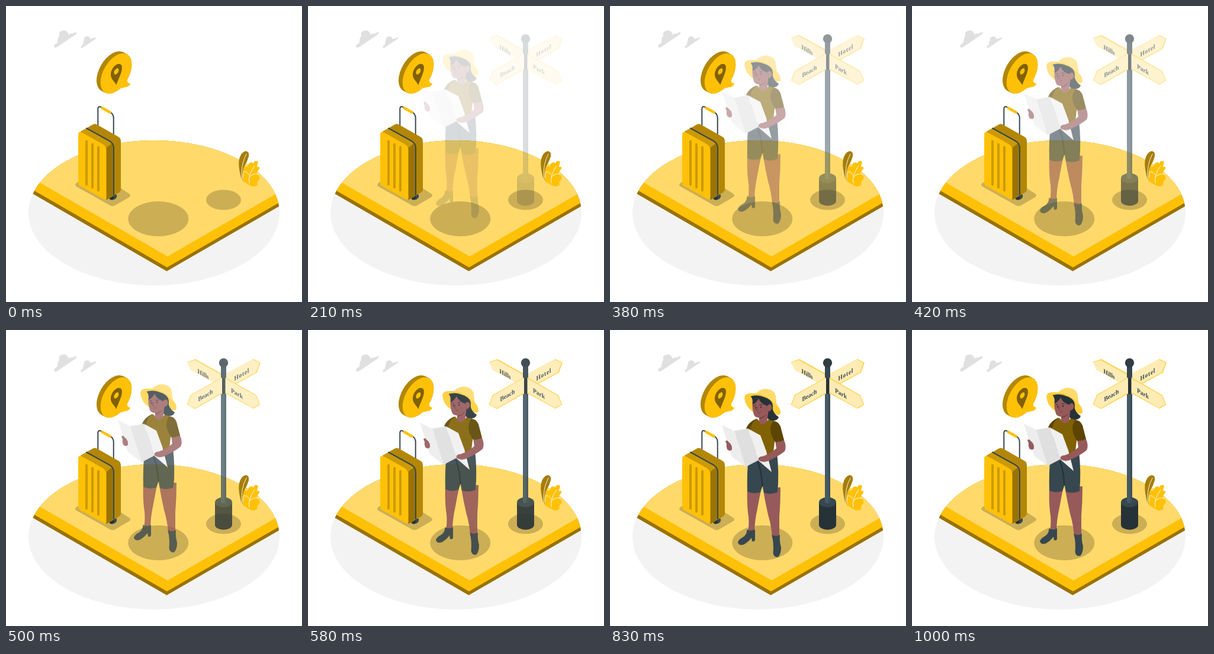
An HTML page with a canvas for the animation above (1040 ms loop, 500 px wide and 500 px high).

```html
<!DOCTYPE html>
<html lang="en">
<head>
<meta charset="utf-8">
<title>Traveller with a map</title>
<style>
  html, body { margin: 0; width: 100%; height: 100%; overflow: hidden; background: #fff; }
  canvas { display: block; width: 500px; height: 500px; }
</style>
</head>
<body>
<canvas id="stage" width="500" height="500"></canvas>
<script>
const SIZE = 500, LOOP = 1040, STEP = 1000 / 24, LAST = 24;
const YELLOW = '#ffc107', PALE = '#ffda6a', CREAM = '#ffecb4', SLATE = '#37474f',
      NIGHT = '#263238', SKIN = '#965a5a', SHADE = '#ccae55', OCHRE = '#b38705',
      BROWN = '#997404', GOLD = '#cc9a06';

const stage = document.getElementById('stage').getContext('2d');
let g;

function layer(draw) {
  const c = document.createElement('canvas');
  c.width = c.height = SIZE;
  g = c.getContext('2d');
  g.lineCap = g.lineJoin = 'round';
  draw();
  return c;
}

function fill(color, path) {
  g.fillStyle = color;
  g.fill(new Path2D(path));
}

function line(color, width, path) {
  g.strokeStyle = color;
  g.lineWidth = width;
  g.stroke(new Path2D(path));
}

function oval(color, x, y, rx, ry, turn = 0) {
  g.fillStyle = color;
  g.beginPath();
  g.ellipse(x, y, rx, ry, turn, 0, Math.PI * 2);
  g.fill();
}

// Draws on an upright isometric plane; slope is -0.5 (rising) or 0.5 (falling).
function onWall(x, y, slope, draw) {
  g.save();
  g.transform(0.866, slope, 0, 1, x, y);
  draw();
  g.restore();
}

function ground() {
  oval('#f3f3f3', 250, 349.5, 212, 122.5);
  g.save();
  g.beginPath();
  g.ellipse(250, 349.5, 212, 122.5, 0, 0, Math.PI * 2);
  g.clip();
  const slab = (color, x, y) => {
    const drop = 300 * 0.578;
    fill(color, `M${x} ${y}L${x - 300} ${y - drop}V0H500L${x + 300} ${y - drop}Z`);
  };
  slab('#9a7204', 271.5, 448);
  slab(YELLOW, 272, 441.5);
  slab(PALE, 273, 423);
  g.restore();
  oval(SHADE, 257.3, 359.5, 51, 29.5);
  oval(SHADE, 367.5, 327.5, 29.5, 17);
}

function cloud(x, y, k) {
  g.save();
  g.translate(x, y);
  g.scale(k, k);
  fill('#e0e0e0', 'M0 27Q1 23 6 21Q6 12 9 10Q7 3 13 1Q22 -2 25 8Q27 4 30 6L37 3Q40 4 37 7L6 28Q1 31 0 27Z');
  g.restore();
}

function suitcase() {
  fill(SHADE, 'M119 299L124 296L194 308L208 317Q212 320 208 323L184 337Q180 339 176 337L119 305Q115 302 119 299Z');
  oval(SLATE, 181, 322, 6.5, 5.2, -0.5);
  oval(NIGHT, 178, 323, 4, 4.5);
  line(SLATE, 2, 'M155.3 203V174Q155.3 168 161 171L176 179Q181.7 183 181.7 189V219');
  line(YELLOW, 4.6, 'M162.5 172.3L175.5 179.5');
  fill(OCHRE, 'M126 212L147 200Q150 198.500 153 200L190 221Q194 223 194 229V309Q194 313 191 315L171 327L160 300L140 240Z');
  fill(GOLD, 'M126 212L136 206.500L175 228L181 233L170 239Z');
  fill(BROWN, 'M169 243Q170 238 175 235L181 231V320L172 326L169 327Z');
  fill(YELLOW, 'M122 218Q122 210 129 214L163 233Q169.500 237 169.500 243V324Q169.500 328 165 326L125 304Q122 302 122 299Z');
  line(SLATE, 2, 'M136 206.500L174 227.500Q182 232 182 240V319');
  for (let i = 0; i < 3; i++) {
    const x = 136 + i * 10, y = 228.500 + i * 5;
    line(GOLD, 4, `M${x} ${y}V${y + 73}`);
  }
}

function bubble() {
  const disc = (color, x, y) => onWall(x, y, -0.5, () => oval(color, 0, 0, 30.4, 30.4));
  for (let i = 0; i <= 14; i++) disc(OCHRE, 179.3 + i * 0.48, 110.6 + i * 0.24);
  disc(YELLOW, 186, 114);
  fill(YELLOW, 'M205 120Q203 131 210.500 131Q207 137 202 137L190 140Z');
  onWall(186.4, 110, -0.5, () => {
    fill('#806104', 'M-11 0A11 11 0 0 1 11 0C11 8 4 15 0 23.500C-4 15 -11 8 -11 0Z');
    oval(YELLOW, 0, 0.500, 4.6, 4.6);
  });
}

function plant() {
  fill('#a67d05', 'M398 293Q392 273 393.500 261Q396 247 405 245Q411.500 246 410 254Q408 262 403 270Q398 281 400 294Z');
  line('#fff', 0.9, 'M398.500 293Q396 268 406 250');
  fill(YELLOW, 'M400 296Q403 284 401 278Q400 272 404 271Q408 272 409 270Q409 264 416 264Q418 268 419 263Q424 260 426 264Q424 269 424 272Q429 270 428 275Q423 280 424 284Q430 287 428 293Q423 296 425 302Q420 306 414 304Q408 301 400 296Z');
  line('#fff', 0.9, 'M411 299Q408 286 420 270M402 280Q407 279 410 285M426 284Q417 282 411 289');
}

function signpost() {
  // Base and post
  fill(NIGHT, 'M353 291V329A14.500 8.500 0 0 0 382 329V291Z');
  oval(SLATE, 367.5, 291, 14.5, 8.5);
  fill('#455a64', 'M363 108H372V290A4.500 2.600 0 0 1 363 290Z');
  fill('#3c4f58', 'M369 108H372V290L369 292Z');
  // Boards, upper pair behind
  fill('#ffd352', 'M306 54L320 49L364 73.500V96L312 67Z');
  fill(CREAM, 'M306 55L319 51L364 76V96L312 67.500Z');
  fill('#ffd352', 'M371 74L418 49L430 55L424 72L371 101Z');
  fill(CREAM, 'M371 74L417 50L428 55.500L422 71.500L371 99Z');
  fill('#ffd352', 'M364.500 80L312 109.500L305.500 126L319 133.500L364.500 108Z');
  fill(CREAM, 'M364.500 81L313 110.500L307 126L319 132L364.500 106Z');
  fill('#ffd352', 'M370.500 80L423 110L429.500 126L418 133L370.500 107Z');
  fill(CREAM, 'M370.500 82L422 111L428 125.500L417 131.500L370.500 105Z');
  fill(NIGHT, 'M365 80H370.500V108H365Z');
  fill(SLATE, 'M363 60H372V79A4.500 2.600 0 0 1 363 79Z');
  oval('#2f3d44', 367.5, 55.5, 7.7, 7.7);

  g.font = 'bold 11px "Liberation Serif", "Times New Roman", serif';
  const label = (text, x, y, slope, gap = '0px') => onWall(x, y, slope, () => {
    g.letterSpacing = gap;
    g.fillStyle = SLATE;
    g.fillText(text, 0, 0);
  });
  label('Hills', 323.5, 72.5, 0.5);
  label('Hotel', 385.5, 86, -0.5, '0.8px');
  label('Beach', 324.5, 121, -0.5);
  label('Park', 380, 105, 0.5);
}

function head() {
  fill('#ffcd38', 'M227 114Q228 106 240 107Q264 106 277 121Q289 132 288 141Q286 146 279 142L241 138Q228 129 227 114Z');
  fill(PALE, 'M247 107Q254 99 264 99.500Q277 101 279.500 110L282 128Q266 110 247 107Z');
  fill(NIGHT, 'M264 122Q276 126 275 135Q278 143 285 147Q283 154 274 153Q264 152 264 142Z');
  fill(SKIN, 'M251 138L268 134L266 150Q267 157 258 160Q249 157 252 151Z');
  fill('#7d4747', 'M252 148Q260 147 265 141Q262 149 252 151Z');
  fill(SKIN, 'M241 116Q239 131 243 143Q245 149 254 148Q264 146 268 133L266 117Z');
  fill(NIGHT, 'M237.500 112Q250 108 262 114Q276 119 275 131L267 137L265 128Q255 125 251 116Q246 124 241 126Q242 117 237.500 112Z');
  oval(SKIN, 269, 131.5, 4.5, 6, 0.3);
  oval(NIGHT, 246, 131.5, 1, 1.4);
  oval(NIGHT, 255, 130.5, 1, 1.4);
  line(NIGHT, 1, 'M243 128L246 127.500M253 126.500L257 127');
  line('#6b3a3a', 0.9, 'M249 130L247.500 136H250M250 140Q253 140 254.500 138.500');
}

function woman() {
  // Legs and boots
  fill(SKIN, 'M232 266H256Q252 285 249 302Q244 324 244 344L233 343Q236 325 233 308Q231 290 232 266Z');
  fill(SKIN, 'M258 266H288Q288 292 286 316L286 352L274 352Q273 332 267 312Q262 290 258 266Z');
  fill(SLATE, 'M231.500 337Q238 341 245 337V355Q244 358 240 357L239 351Q234 358 226 362.500Q218 365 216 359Q217 354 224 350.500Q231 347 231.500 337Z');
  fill(SLATE, 'M273.500 346Q280 350 287 346Q286 357 289 367Q289 379 284 383.500Q277 385 275.500 377Q277 362 273.500 346Z');
  // Clothes
  fill(SLATE, 'M234 212L282 207Q286 242 283 274Q271 279 260 275L258 263L254 274Q242 278 232 273Q231 242 234 212Z');
  line(NIGHT, 2.2, 'M250 224Q256 238 257.500 264');
  fill('#5c4503', 'M247 150Q235 155 230 166L241 176L252 160Z');
  fill('#806104', 'M249 150Q258 166 269 149.500L278 154Q285 174 278 190L276 207Q256 214 240 206L237 166Q241 153 249 150Z');
  head();
  // Map
  fill('#ededed', 'M189 160.500L210 170.500L229 231.500L206 214Z');
  fill('#dfdfdf', 'M210 170.500L233 166.500L251 220L229 231.500Z');
  fill('#f0f0f0', 'M233 166.500L254 178L264 205L273 240L251 221Z');
  // Hands and near arm
  fill(SKIN, 'M195 188Q198 185 200 189Q207 194 206 202Q203 206 198 202Q196 197 197 193Z');
  fill(SKIN, 'M279 187L293.500 185Q299 197 295 205Q285 213 270 220Q259 226 251 220Q249 214 258 213.500Q271 209 281 200Z');
  fill('#5c4503', 'M276 154Q284 154 288 163L294 186Q287 190 279 189Q271 178 271 167Q272 158 276 154Z');
}

const scenery = layer(() => {
  g.fillStyle = '#fff';
  g.fillRect(0, 0, SIZE, SIZE);
  ground();
  cloud(81, 41, 1);
  cloud(126, 51, 0.68);
  plant();
  suitcase();
  bubble();
});
const post = layer(signpost);
const person = layer(woman);

const ease = (t, span) => Math.sin(Math.min(t / span, 1) * Math.PI / 2) ** 2;

// Settles from above, then starts to drift up again.
function height(t) {
  const drift = Math.max(0, (t - 770) / 230);
  return -31 * (1 - ease(t, 760)) - 1.9 * drift * drift;
}

function render(now) {
  const step = Math.min(LAST, Math.floor((now % LOOP + 4) / STEP));
  const t = step * STEP;
  stage.globalAlpha = 1;
  stage.drawImage(scenery, 0, 0);
  stage.globalAlpha = ease(t, 725);
  stage.drawImage(post, 0, 0);
  stage.drawImage(person, 0, height(t));
}

const start = performance.now();
function tick() {
  render(performance.now() - start);
  requestAnimationFrame(tick);
}
tick();
</script>
</body>
</html>
```
